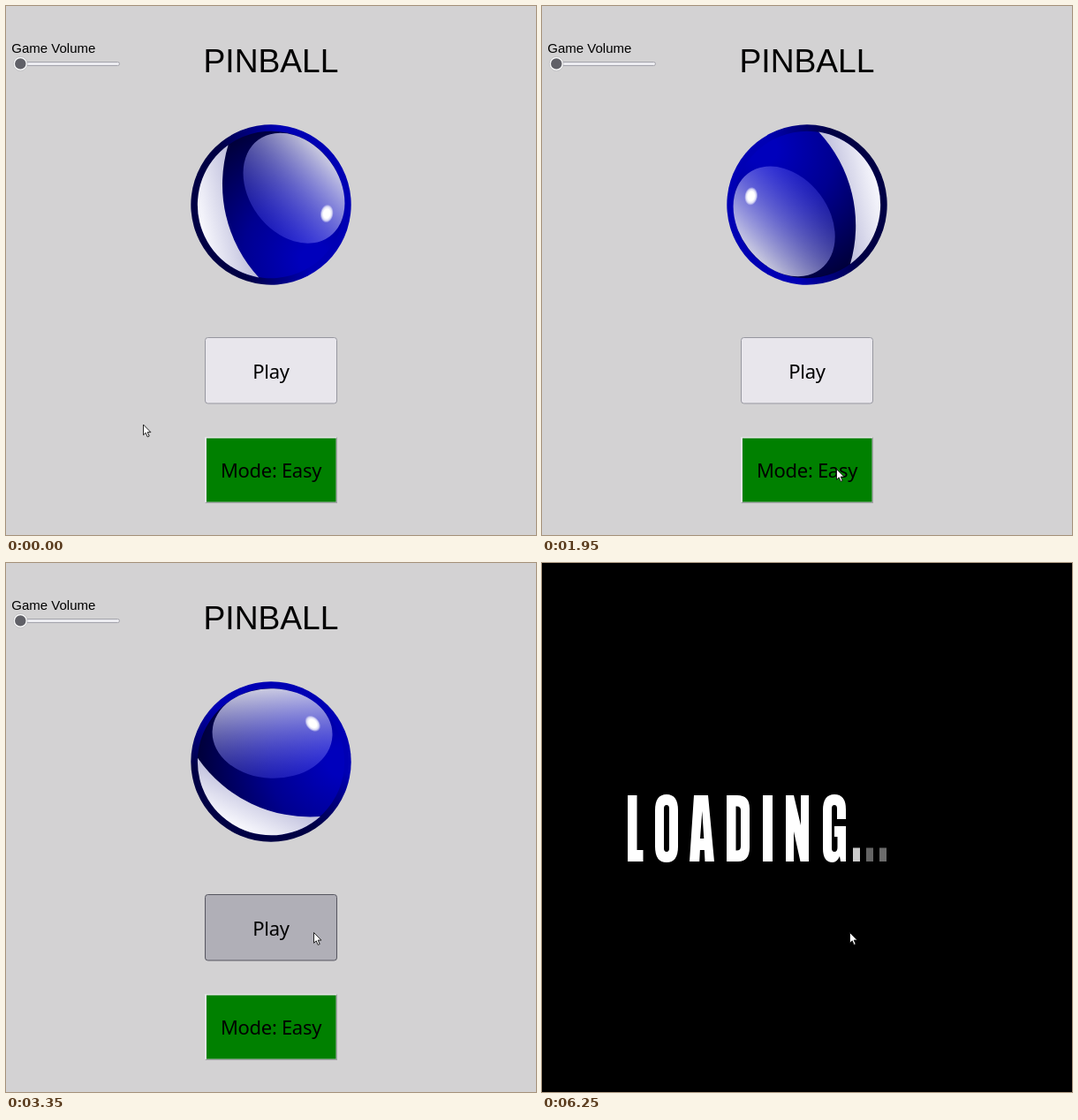
Animation, 600 px wide and 599 px high, one loop 6300 ms. Source, as an HTML page:

```html
<!DOCTYPE html>
<html lang="en">
<head>
<meta charset="utf-8">
<title>Pinball menu</title>
<style>
html, body { margin: 0; width: 100%; height: 100%; overflow: hidden; background: #d3d2d3; }
svg { display: block; width: 100vw; height: 100vh; }
.arial { font-family: "Liberation Sans", Arial, sans-serif; }
.btn { font: 22px "Noto Sans", sans-serif; letter-spacing: -.3px; text-anchor: middle; }
</style>
</head>
<body>
<svg viewBox="0 0 600 599" preserveAspectRatio="none">
  <defs>
    <linearGradient id="rim" gradientUnits="userSpaceOnUse" x1="-40" y1="80" x2="40" y2="-80">
      <stop offset=".25" stop-color="#000044"/>
      <stop offset=".65" stop-color="#0000b4"/>
    </linearGradient>
    <radialGradient id="body" gradientUnits="userSpaceOnUse" cx="80" cy="0" r="165">
      <stop offset=".1" stop-color="#0000bc"/>
      <stop offset=".5" stop-color="#000090"/>
      <stop offset="1" stop-color="#000038"/>
    </radialGradient>
    <linearGradient id="gloss" gradientUnits="userSpaceOnUse" x1="-6" y1="-83" x2="4" y2="19">
      <stop offset="0" stop-color="#fff" stop-opacity=".8"/>
      <stop offset=".5" stop-color="#b4b4ff" stop-opacity=".53"/>
      <stop offset="1" stop-color="#6464ff" stop-opacity=".3"/>
    </linearGradient>
    <linearGradient id="shine" gradientUnits="userSpaceOnUse" x1="-36" y1="75" x2="-10" y2="22">
      <stop offset="0" stop-color="#f8f8fd"/>
      <stop offset="1" stop-color="#b4b4d6"/>
    </linearGradient>
    <radialGradient id="glint">
      <stop offset=".5" stop-color="#fff"/>
      <stop offset=".75" stop-color="#fff" stop-opacity=".75"/>
      <stop offset="1" stop-color="#fff" stop-opacity="0"/>
    </radialGradient>
  </defs>

  <g id="menu">
    <rect width="600" height="599" fill="#d3d2d3"/>
    <text class="arial" x="300" y="75" font-size="37.2" text-anchor="middle">PINBALL</text>
    <text class="arial" x="6.3" y="52.5" font-size="15">Game Volume</text>
    <rect x="9.5" y="63.5" width="119" height="4" rx="2" fill="#ececf0" stroke="#a3a3ab"/>
    <circle cx="16.3" cy="65.4" r="8" fill="#fafafa" stroke="#b4b4b8" stroke-width=".7"/>
    <circle cx="16.3" cy="65.4" r="6.2" fill="#606067"/>

    <g id="ball">
      <circle r="90.7" fill="url(#rim)"/>
      <circle r="83.2" fill="url(#body)"/>
      <path d="M-83-4A155 155 0 0 0 56 62A83.4 83.4 0 0 1-83-4Z" fill="url(#shine)"/>
      <ellipse cx="1.5" cy="-32" rx="68" ry="50.8" transform="rotate(2 1.5 -32)" fill="url(#gloss)"/>
      <ellipse cx="64" rx="7.5" ry="10.5" transform="rotate(-42.5)" fill="url(#glint)"/>
    </g>

    <rect id="play" x="225.5" y="375.5" width="149" height="74.5" rx="3"/>
    <text class="btn" x="300" y="421.5">Play</text>

    <path d="M225 563V488H375L373.5 489.5H227V561.5Z" fill="#e4e4e6"/>
    <path d="M225 563H375V488L373.5 489.5V561.5H227Z" fill="#a2a2a6"/>
    <rect id="mode" x="227" y="489.5" width="146.5" height="72"/>
    <text id="modeText" class="btn" x="300" y="534"></text>
  </g>

  <g id="loading" role="img" aria-label="LOADING...">
    <rect width="600" height="599"/>
    <g id="letters" fill="#fff" fill-rule="evenodd"></g>
    <g id="dots" fill="#fff"></g>
  </g>

  <path id="cursor" d="M.5.5V12.3L3.2 9.8L5.2 14.4L7.2 13.5L5.2 9.1H8.9Z" fill="#fff" stroke="#111" stroke-width=".9"/>
</svg>
<script>
const LOOP = 6300, CUT = 3400;
const $ = id => document.getElementById(id);
const clamp = v => Math.max(0, Math.min(1, v));
const ease = v => (1 - Math.cos(Math.PI * clamp(v))) / 2;

// Heavy condensed capitals, L O A D I N G
const glyphs = [
  "M97 263H107.5V325H114.5V338H97Z",
  "M128 280Q128 262 141 262T154 280V321Q154 339 141 339T128 321ZM138 278V323Q138 327 141 327T144 323V278Q144 274 141 274T138 278Z",
  "M172 263H188L195 338H184.5L183.8 325H178.9L178.2 338H167ZM181.3 281L179 312H183.3Z",
  "M209 263H221Q235 263 235 278V322Q235 338 222 338H209ZM219.5 275.5V325.5Q225 326 225 321V280Q225 275 219.5 275.5Z",
  "M250 263H261V338H250Z",
  "M276 263H285L293 297V263H302V338H292.5L285 304V338H276Z",
  "M344 290H334V278Q334 274 331 274T328 278V323Q328 327 331 327Q334.5 327 334.5 322V310H331V298H344V338H338L337 332Q334 339 329 339Q318 339 318 323V280Q318 262 331 262T344 279Z"
];

function add(parent, tag, attrs) {
  const el = document.createElementNS("http://www.w3.org/2000/svg", tag);
  for (const k in attrs) el.setAttribute(k, attrs[k]);
  return $(parent).appendChild(el);
}
const letters = glyphs.map(d => add("letters", "path", { d }));
const dots = [352, 367, 382].map(x => add("dots", "rect", { x, y: 322.5, width: 8, height: 15.5 }));

function cursorAt(t) {
  const a = ease((t - 50) / 400), b = ease((t - 2000) / 350);
  return [155 + 178 * a + 15 * b, 473.5 + 50.5 * a - 106 * b];
}

// Each dot fades up and down again without end
function pulse(age) {
  if (age <= 0) return 0;
  const p = (age / 600) % 2;
  return p < 1 ? p : 2 - p;
}

function draw(t) {
  const inMenu = t < CUT;
  $("menu").style.display = inMenu ? "" : "none";
  $("loading").style.display = inMenu ? "none" : "";
  $("cursor").setAttribute("transform", `translate(${cursorAt(t)})`);

  if (inMenu) {
    $("ball").setAttribute("transform", `translate(300 225) rotate(${0.0921 * (t - 3350)})`);
    const hard = t >= 550 && t < 1700;
    $("mode").setAttribute("fill", hard ? "#f00" : "#008000");
    $("modeText").textContent = hard ? "Mode: Hard" : "Mode: Easy";
    const hover = t >= 2200, down = t >= 3300;
    $("play").setAttribute("fill", down ? "#b0afb7" : hover ? "#d0cfd8" : "#e8e6ec");
    $("play").setAttribute("stroke", down ? "#55555f" : hover ? "#74747e" : "#96969f");
  } else {
    letters.forEach((el, i) => el.setAttribute("opacity", clamp((t - 3625 - i * 108) / 130)));
    dots.forEach((el, i) => el.setAttribute("opacity", pulse(t - 4575 - i * 712)));
  }
}

const start = performance.now();
function tick() {
  draw((performance.now() - start) % LOOP);
  requestAnimationFrame(tick);
}
tick();
</script>
</body>
</html>
```
